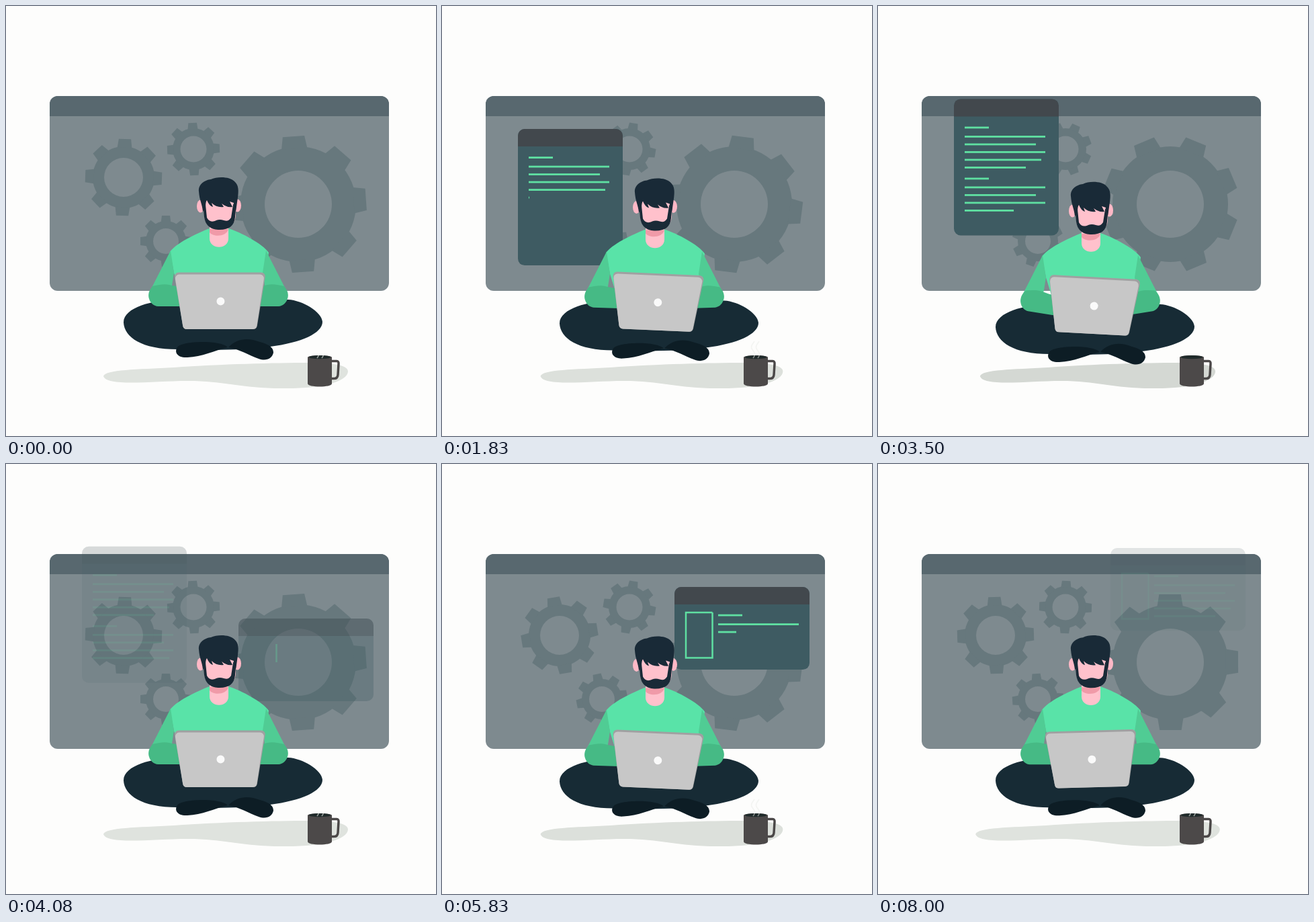
These frames come from a looping animation (640x640 px, 8080 ms). An HTML page with a canvas:

```html
<!DOCTYPE html>
<html>
<head>
<meta charset="utf-8">
<style>
html, body { margin: 0; width: 100%; height: 100%; overflow: hidden; background: #fdfdfc; }
canvas { display: block; width: 100vmin; height: 100vmin; }
</style>
</head>
<body>
<canvas id="stage" width="640" height="640"></canvas>
<script>
const c = document.getElementById('stage').getContext('2d');
const LOOP = 8080, FPS = 12, TAU = Math.PI * 2;
const clamp = v => Math.max(0, Math.min(1, v));
const mix = (a, b, k) => a + (b - a) * k;

function fill(d, color) {
  c.fillStyle = color;
  c.fill(new Path2D(d));
}

function ellipse(x, y, rx, ry, color) {
  c.fillStyle = color;
  c.beginPath();
  c.ellipse(x, y, rx, ry, 0, 0, TAU);
  c.fill();
}

function box(x, y, w, h, r, color) {
  c.fillStyle = color;
  c.beginPath();
  c.roundRect(x, y, w, h, r);
  c.fill();
}

function rounded(points, r, color) {
  const n = points.length, last = points[n - 1], first = points[0];
  c.fillStyle = color;
  c.beginPath();
  c.moveTo((first[0] + last[0]) / 2, (first[1] + last[1]) / 2);
  points.forEach((p, i) => c.arcTo(...p, ...points[(i + 1) % n], r));
  c.closePath();
  c.fill();
}

function turned(x, y, deg, draw) {
  c.save();
  c.translate(x, y);
  c.rotate(deg * Math.PI / 180);
  c.translate(-x, -y);
  draw();
  c.restore();
}

// Window and gears
function gear(x, y, tip, body, hole, deg) {
  c.save();
  c.translate(x, y);
  c.fillStyle = '#67787d';
  c.beginPath();
  c.arc(0, 0, body, 0, TAU);
  c.arc(0, 0, hole, 0, TAU, true);
  c.fill();
  c.rotate(deg * Math.PI / 180);
  for (let i = 0; i < 8; i++) {
    c.beginPath();
    c.moveTo(-tip * 0.19, -body * 0.96);
    c.lineTo(-tip * 0.16, -tip);
    c.lineTo(tip * 0.16, -tip);
    c.lineTo(tip * 0.19, -body * 0.96);
    c.fill();
    c.rotate(TAU / 8);
  }
  c.restore();
}

function backdrop(t) {
  const a = t * 45;
  box(65, 134, 505, 290, 12, '#7e8a8f');
  box(65, 134, 505, 30, [12, 12, 0, 0], '#58686f');
  gear(175, 255, 57, 46, 29, 2 + a);
  gear(279, 213, 39, 31, 19.5, -2 - a);
  gear(238, 350, 38, 30, 19, a);
  gear(435, 295, 101, 86, 50, -4 - a);
}

// Code cards
const LINES = [36, 120, 106, 120, 114, 91, 36, 120, 106, 120, 114];
const STEPS = [13.5, 11.5, 11.5, 11.5, 11.5, 16.5, 13, 11.5, 11.5, 11.5, 0];

function typeLines(x, y, count, left) {
  for (let i = 0; i < count && left > 0; i++) {
    c.fillRect(x, y - 1.4, Math.min(LINES[i], left), 2.8);
    left -= LINES[i];
    y += STEPS[i];
  }
}

function card(x, y, w, h, alpha, content) {
  if (alpha <= 0) return;
  c.save();
  c.globalAlpha = alpha;
  box(x, y, w, h, 10, '#3e5b62');
  box(x, y, w, 26, [10, 10, 0, 0], '#42484d');
  c.fillStyle = c.strokeStyle = '#5fe0a2';
  content();
  c.restore();
}

function cards(t) {
  const y1 = 230 - 26.8 * t, y2 = 230 - 26.8 * (t - 4);
  const alpha1 = clamp(t / 0.5) * clamp((4.05 - t) / 0.45);
  card(113, y1, 156, 203, alpha1, () => typeLines(129, y1 + 42.5, 11, 327 * (t - 0.23)));

  const alpha2 = clamp((t - 3.85) / 0.5) * clamp((7.95 - t) / 0.45);
  card(346, y2, 201, 123, alpha2, () => {
    const drawn = 27 + 212 * (t - 4), top = y2 + 38, rim = 215;
    c.lineWidth = 2.5;
    c.setLineDash([Math.max(0, Math.min(rim, drawn)), 400]);
    c.stroke(new Path2D(`M402.5 ${top}v67.5h-39.5v-67.5h39.5`));
    typeLines(411, y2 + 42, 6, drawn - rim);
  });
}

// Person
const SKIN = '#ffc1cc', HAIR = '#192a37', SHOE = '#0d1d25';

function legs() {
  fill('M250 437C220 438 175 448 175 471C176 493 202 511 255 511C300 512 350 513 393 507C440 501 471 487 471 470C470 455 441 438 420 437Z', '#172b35');
  fill('M330 508C320 497 262 498 255 508C250 515 255 524 270 523C292 522 310 513 330 508Z', SHOE);
  fill('M331 508C345 493 362 494 378 500C393 504 398 509 398 516C396 525 387 529 376 525C362 520 348 511 331 508Z', SHOE);
}

function torso() {
  fill('M303 331C282 339 252 354 244 366L250 397L257 420L264 445H374L380 420L386 397L391 367C382 354 350 337 331 331Z', '#59e3a8');
  fill('M303 325H331V346C331 363 303 363 303 346Z', SKIN);
  fill('M303 332H331C328 344 308 344 303 337Z', '#f09aa8');
}

function arm(bend) {
  fill('M245 364L218 417Q211 428 213 435L241 438L247 416L250 397Z', '#50cc94');
  turned(222, 431, bend, () =>
    fill('M218 417C226 415 236 413 243 415Q251 417 264 418V447H226C215 446 209 433 214 423Z', '#46ba85'));
}

function head() {
  ellipse(289.5, 298, 5.5, 9.5, '#ffb8c6');
  ellipse(344.5, 297, 5.5, 9.5, '#ffb8c6');
  fill('M294 280H342V312C341 325 332 331 318 331C304 331 296 325 295 312Z', SKIN);
  fill('M292 282L295 314C297 328 306 333 318 333C332 333 340 327 341 314L344 282L338 296L335 315C331 321 328 320 324 319Q318 317 313 319C307 322 302 321 299 315L297 296Z', HAIR);
  fill('M293 306C292 294 288 290 287 276C286 265 296 259 305 258C315 253 334 254 340 261C347 267 346 276 345 285L342 306L339 293L333 291L337 299C331 300 326 298 321 294L324 299C317 300 311 298 306 293L308 299C304 298 301 294 299 289Q297 291 297 300Z', HAIR);
}

function laptop() {
  rounded([[250, 396.5], [387, 396.5], [373, 481], [264, 481]], 6, '#a0a0a1');
  rounded([[251, 399.5], [385, 399.5], [372.5, 481], [264, 481]], 6, '#c7c7c7');
  ellipse(319.5, 439.5, 6, 6, '#fafafa');
}

function person(t, lift) {
  const tilt = 0.4 + 2.6 * Math.sin(TAU * (t / 0.8 - 0.031));
  const look = t > 6 && t < 7.9 ? Math.sin(Math.PI * (t - 6) / 1.9) ** 2 : 0;
  c.save();
  c.translate(0, 11 * lift);
  legs();
  torso();
  arm(14 * lift);
  c.save();
  c.translate(632, 0);
  c.scale(-1, 1);
  arm(14 * lift);
  c.restore();
  turned(317, 360, 3.3 * look, head);
  turned(319, 480, tilt, laptop);
  c.restore();
}

// Floor
function shadow(lift) {
  const k = mix(1, 0.94, lift);
  c.save();
  c.translate(327 * (1 - k), 0);
  c.scale(k, 1);
  const rgb = [223, 227, 222].map(v => v - 18 * lift);
  fill('M145 551C148 541 195 541 250 538C320 533 400 531 450 531C490 531 509 535 509 544C508 559 470 570 410 569C350 569 325 558 270 558C220 558 150 567 145 551Z', `rgb(${rgb})`);
  c.restore();
}

function mug(t) {
  c.strokeStyle = '#4b4848';
  c.lineWidth = 3.5;
  c.stroke(new Path2D('M483 528.5H492Q495.5 528.5 495 533L494 549Q493.5 554.5 488 554.5H483'));
  fill('M449 523C449 519 485 519 485 523V562C485 568 449 568 449 562Z', '#4c4949');
  ellipse(467, 522.7, 16, 2.6, '#1f2a2a');

  const u = (t + 0.15) % 4;
  const rise = 5 + 20 * clamp(u / 1.8), fade = clamp((3 - u) / 1.3);
  if (fade <= 0) return;
  c.save();
  c.globalAlpha = 0.6 * fade;
  c.strokeStyle = '#e9ece8';
  c.lineWidth = 1.6;
  for (const x of [463, 470]) {
    c.beginPath();
    for (let y = 0; y <= rise; y++) c.lineTo(x + 2.5 * Math.sin(y / 3.5), 524 - y);
    c.stroke();
  }
  c.restore();
}

function draw(t) {
  const lift = (1 - Math.cos(Math.PI * t)) / 2;
  c.fillStyle = '#fdfdfc';
  c.fillRect(0, 0, 640, 640);
  shadow(lift);
  backdrop(t);
  cards(t);
  person(t, lift);
  mug(t);
}

// Twelve poses a second, each starting on a whole hundredth
const startOf = n => Math.round(n * 100 / FPS) * 10;

function pose(ms) {
  let n = Math.round(ms * FPS / 1000);
  if (startOf(n) > ms) n--;
  return Math.max(0, n - 1) / FPS;
}

const begin = performance.now();
function tick() {
  draw(pose((performance.now() - begin) % LOOP));
  requestAnimationFrame(tick);
}
tick();
</script>
</body>
</html>
```
